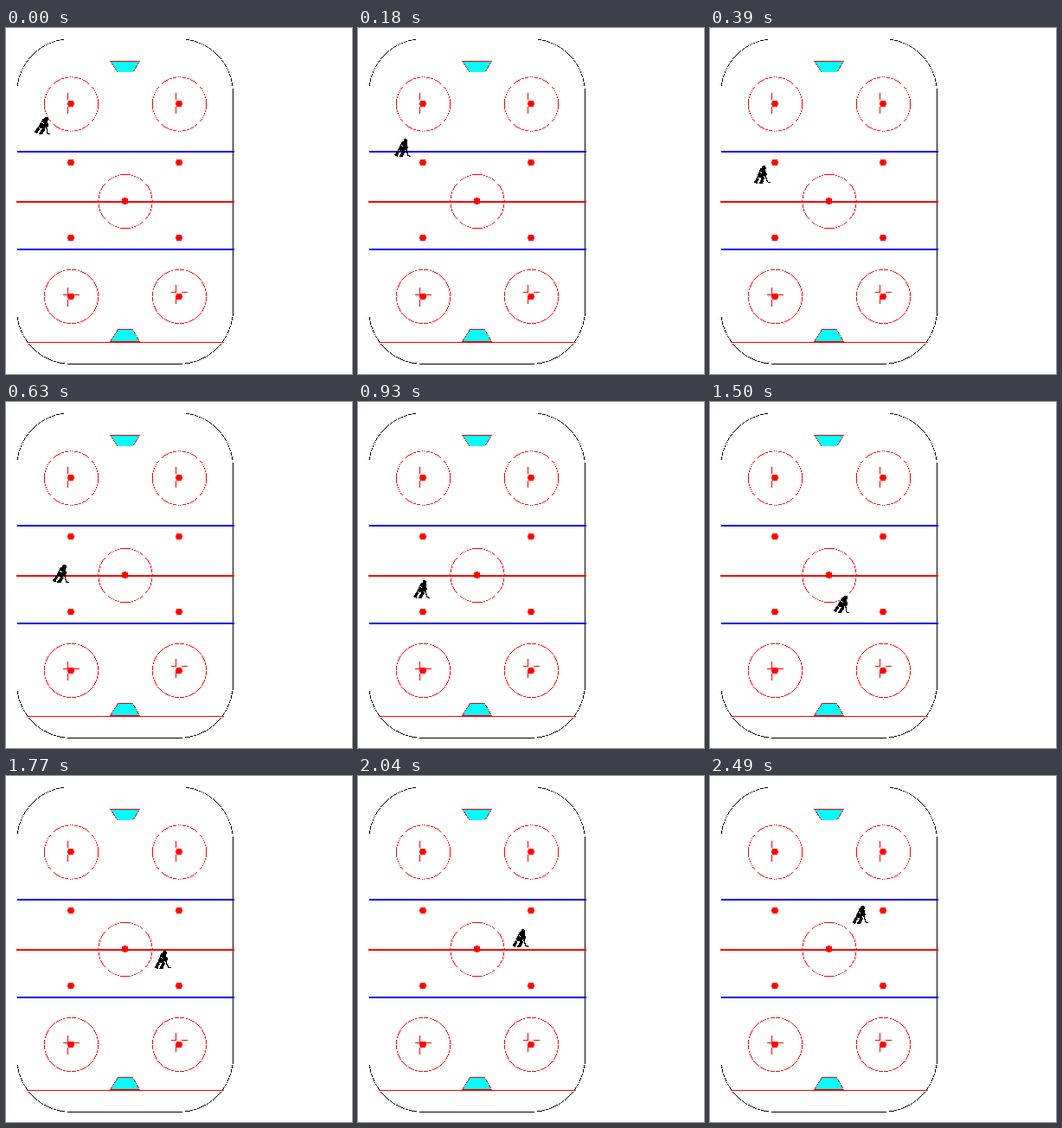
Write an HTML page with a canvas that moves like this. It is 400 px wide and 400 px high and loops after 2550 ms.

```html
<!DOCTYPE html>
<html lang="en">
<head>
<meta charset="utf-8">
<title>Skating drill</title>
<style>
  html, body { margin: 0; width: 100%; height: 100%; overflow: hidden; background: #fff; }
  canvas { display: block; width: 400px; height: 400px; }
</style>
</head>
<body>
<canvas id="stage" width="400" height="400"></canvas>
<script>
const RED = '#f00', BLUE = '#00f', CYAN = '#0ff', BLACK = '#000';
const LOOP = 2550, STEP = 30, LAST = 2490, LEG = 540;
const SIZE = 400, SPRITE = 40, QUARTER = Math.PI / 2;

const stage = document.getElementById('stage').getContext('2d');

function makeLayer(size) {
  const canvas = document.createElement('canvas');
  canvas.width = canvas.height = size;
  return canvas.getContext('2d', { willReadFrequently: true });
}

// Turns soft edges into hard pixels; thin curves break into dashes.
function harden(ctx, cutoff) {
  const { width, height } = ctx.canvas;
  const image = ctx.getImageData(0, 0, width, height);
  for (let i = 3; i < image.data.length; i += 4) {
    image.data[i] = image.data[i] > cutoff ? 255 : 0;
  }
  ctx.putImageData(image, 0, 0);
}

function crisp(target, color, draw) {
  const layer = makeLayer(SIZE);
  layer.fillStyle = layer.strokeStyle = color;
  draw(layer);
  harden(layer, 160);
  target.drawImage(layer.canvas, 0, 0);
}

function ring(ctx, x, y, radius, from = 0, to = 4 * QUARTER) {
  ctx.beginPath();
  ctx.arc(x, y, radius, from, to);
  ctx.stroke();
}

function dot(ctx, x, y, radius) {
  ctx.beginPath();
  ctx.arc(x, y, radius, 0, 4 * QUARTER);
  ctx.fill();
}

// A goal seen from above: wide edge at y, narrow edge at y + depth.
function goalPath(ctx, y, depth) {
  ctx.beginPath();
  ctx.moveTo(129.5, y + depth);
  ctx.lineTo(120.5, y);
  ctx.lineTo(154.5, y);
  ctx.lineTo(146.5, y + depth);
}

function paintBoards(c) {
  const cut = 0.11;
  ring(c, 75, 75, 62.5, 2 * QUARTER + cut, 3 * QUARTER - cut);
  ring(c, 200, 75, 62.5, 3 * QUARTER + cut, 4 * QUARTER - cut);
  ring(c, 200, 326, 62.5, cut, QUARTER);
  ring(c, 75, 326, 62.5, QUARTER, 2 * QUARTER - cut);
  c.fillRect(262, 70, 1, 263);
  c.fillRect(75, 388, 125, 1);
}

function paintRedMarks(c) {
  goalPath(c, 38.5, 13);
  c.stroke();
  goalPath(c, 362.5, -14);
  c.closePath();
  c.stroke();
  c.fillRect(24, 363, 228, 1);
  c.fillRect(12, 200, 252, 2);
  ring(c, 138, 200.5, 31.25);
  dot(c, 137.5, 200, 4);

  for (const x of [75, 200]) {
    ring(c, x + 0.5, 88, 31.25);
    ring(c, x + 0.5, 310.5, 31.25);
    for (const y of [87.5, 155.5, 242.5, 310.5]) dot(c, x, y, 4);

    const shift = x > 100 ? -3 : 0;
    for (const y of [75, 300 + shift]) {
      c.fillRect(x - 4, y, 1, 8);
      c.fillRect(x - 4, y + 16 - 2 * (y > 200), 1, 8);
    }
    c.fillRect(x - 9, 308 + shift, 6, 1);
    c.fillRect(x + 3, 308 + shift, 7, 1);
  }
}

function paintRink() {
  const rink = makeLayer(SIZE);
  rink.fillStyle = '#fff';
  rink.fillRect(0, 0, SIZE, SIZE);
  crisp(rink, BLACK, paintBoards);
  crisp(rink, CYAN, c => {
    goalPath(c, 38.5, 13);
    c.fill();
    goalPath(c, 362.5, -14);
    c.fill();
  });
  crisp(rink, BLUE, c => {
    for (const y of [142, 255]) c.fillRect(13, y, 251, 2);
  });
  crisp(rink, RED, paintRedMarks);
  return rink.canvas;
}

// Corners of the route, each with the sideways bow of the leg that follows.
const route = [
  { x: 43, y: 113, bowX: 3, bowY: -1 },
  { x: 63, y: 192.5, bowX: -3, bowY: 2.5 },
  { x: 81, y: 223.5, bowX: 9, bowY: 11 },
  { x: 165, y: 227.5, bowX: 14, bowY: 0 },
  { x: 181.5, y: 176.5, bowX: 0, bowY: 0 },
  { x: 170, y: 151 }
];

function placeAt(time) {
  const index = Math.floor(time / LEG);
  const u = time / LEG - index;
  const from = route[index], to = route[index + 1];
  const bow = 4 * u * (1 - u);
  return {
    x: from.x + (to.x - from.x) * u + from.bowX * bow,
    y: from.y + (to.y - from.y) * u + from.bowY * bow
  };
}

const sprite = makeLayer(SPRITE);

function limb(width, ...points) {
  sprite.lineWidth = width;
  sprite.beginPath();
  points.forEach(([x, y]) => sprite.lineTo(x, y));
  sprite.stroke();
}

function paintPlayer(lean) {
  sprite.clearRect(0, 0, SPRITE, SPRITE);
  sprite.save();
  sprite.translate(SPRITE / 2, SPRITE / 2);
  sprite.rotate(lean);
  dot(sprite, 3, -8.4, 2.5);
  limb(6.5, [2, -7], [-2, 1.5]);
  limb(3, [2.5, -5.5], [4.5, -1], [2.5, 1.5]);
  limb(3.2, [-2, 0], [-5.5, 4], [-8, 8.5]);
  limb(3.4, [-1, 0], [1, 4], [-2, 9]);
  limb(1.6, [-9.3, 7], [-6, 9.3]);
  limb(1.8, [-4.3, 9.3], [0, 9.3]);
  limb(1.2, [3, -1], [6, 8.6], [9.2, 9.2]);
  sprite.globalCompositeOperation = 'destination-out';
  limb(1, [-2, -3.5], [0.5, -2.5]);
  limb(1, [-5, 2.5], [-3, 3.5]);
  sprite.restore();
  harden(sprite, 120);
}

const rink = paintRink();
const start = performance.now();

function frame(now) {
  const elapsed = Math.max(0, now - start) % LOOP;
  const time = Math.min(LAST, Math.floor(elapsed / STEP) * STEP);
  const { x, y } = placeAt(time);
  paintPlayer(0.09 * Math.cos(2 * Math.PI * time / 750));
  stage.drawImage(rink, 0, 0);
  stage.drawImage(sprite.canvas, Math.round(x - SPRITE / 2), Math.round(y - SPRITE / 2));
  requestAnimationFrame(frame);
}
frame(start);
</script>
</body>
</html>
```
